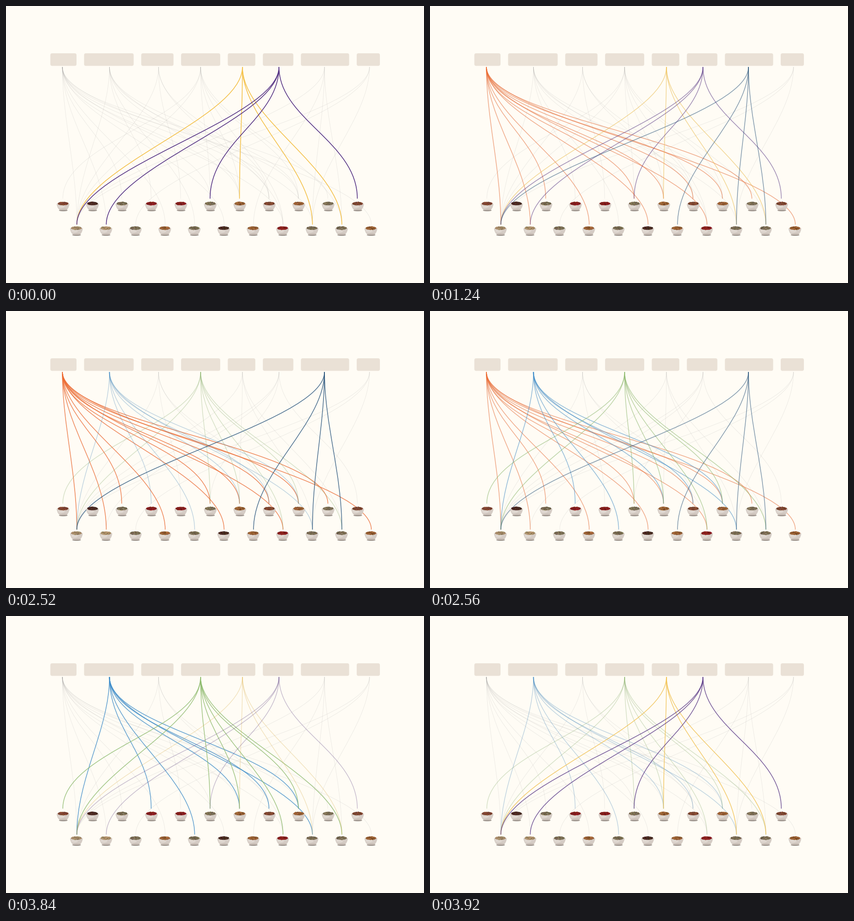
Recreate the animation shown at these times as a matplotlib script. Size 919 px wide and 609 px high, loop 3.96 s.

```python
import numpy as np
import matplotlib.pyplot as plt
from matplotlib.animation import FuncAnimation
from matplotlib.colors import to_rgb
from matplotlib.patches import Ellipse, FancyBboxPatch, PathPatch
from matplotlib.path import Path

W, H, DPI = 919, 609, 64
PX = 72 / DPI                      # one pixel in points
STEP_MS, HOLD, FADE = 40, 30, 3    # frames held and frames of cross-fade
BLOCK = HOLD + FADE
BG, TILE, FAINT = "#fffcf5", "#eae1d6", "#8c8c8c"
TILE_X, TILE_Y, TILE_H, GAP = 97.5, 104, 27.6, 16.65
TOP_Y, TOP_PULL, END_PULL = 134, 115, 125
PER_ROW = 11

# Tile width, start of its strands, colour when lit, bowls reached.
# Bowls count along the upper row, then the lower; all tiles reach SHARED.
SHARED = PER_ROW
SOURCES = [
    (57.5, 124, "#ef6c33", [2, *range(5, 10), 12, 14, 16, 18, 21]),
    (109, 227.5, "#398bcb", [3, 6, 7, 8, 15, 19]),
    (71, 335.3, None, [4, 7, 18]),
    (86, 427.8, "#8cbb6a", [0, 5, 6, 8, 18, 20]),
    (60.5, 519.8, "#f5c24a", [6, 19, 20]),
    (67, 600.2, "#553285", [5, 10, 12]),
    (106, 700.2, "#1f4e79", [17, 19, 20]),
    (51, 799.2, None, [13, 19]),
]
SCENES = [(4, 5), (0, 6), (1, 3)]  # sources lit together

SPICES = {"rust": "#7f4632", "bark": "#4a2a22", "olive": "#7b6e54",
          "red": "#861f1e", "amber": "#965f33", "tan": "#a98d68"}
MIX = """rust bark olive red red olive amber rust amber olive rust
         tan tan olive amber olive bark amber red olive olive amber""".split()

fig = plt.figure(figsize=(W / DPI, H / DPI), dpi=DPI, facecolor=BG)
ax = fig.add_axes([0, 0, 1, 1])
ax.set(xlim=(0, W), ylim=(H, 0))
ax.axis("off")


def bowl_pos(n):
    row, col = divmod(n, PER_ROW)
    return 125.5 + 29.3 * row + 64.75 * col, 436 + 54 * row


def curve(x0, bowl):
    row = bowl // PER_ROW
    x1 = bowl_pos(bowl)[0] - 0.6 + 1.5 * row
    y1 = 423.5 + 57 * row
    pts = [(x0, TOP_Y), (x0, TOP_Y + TOP_PULL), (x1, y1 - END_PULL), (x1, y1)]
    return Path(pts, [Path.MOVETO] + [Path.CURVE4] * 3)


def strand(path, color, width, **kw):
    return ax.add_patch(PathPatch(path, fc="none", ec=color, lw=width * PX,
                                  capstyle="butt", **kw))


def oval(x, y, w, h, color, z):
    return ax.add_patch(Ellipse((x, y), w, h, fc=color, ec="none", zorder=z))


def draw_bowl(n, rng):
    x, y = bowl_pos(n)
    z = 10 + n // PER_ROW
    oval(x + 0.4, y + 13.4, 19, 3.6, "#958c85", z)

    # half of a bowl outline, mirrored for the right side
    side = np.array([(-14, -1), (-13.2, 8), (-9, 12), (-6, 13)])
    pts = np.vstack([side, side[::-1] * (-1, 1), side[:1]]) + (x, y)
    codes = ([Path.MOVETO] + [Path.CURVE4] * 3 + [Path.LINETO]
             + [Path.CURVE4] * 3 + [Path.CLOSEPOLY])
    body = ax.add_patch(PathPatch(Path(pts, codes), fc="#d5ccc5", ec="none", zorder=z))
    oval(x - 4, y + 4, 15, 9, "#dfd7d0", z).set_clip_path(body)
    oval(x + 2, y + 12, 20, 5, "#c9beb6", z).set_clip_path(body)
    oval(x, y - 0.8, 28, 5, "#ddd5ce", z)

    fill = SPICES[MIX[n]]
    oval(x, y - 1.6, 23.5, 7.6, fill, z)
    count = 60
    r, ang = np.sqrt(rng.random(count)), rng.uniform(0, 2 * np.pi, count)
    dots = np.array(to_rgb(fill)) * rng.uniform(0.66, 1.3, (count, 1))
    dots += rng.normal(0, 0.035, (count, 3))
    ax.scatter(x + 11.3 * r * np.cos(ang), y - 1.7 + 3.7 * r * np.sin(ang),
               s=(1.7 * PX) ** 2, c=np.clip(dots, 0, 1), lw=0, zorder=z)


lit = {}
left = TILE_X
for src, (width, x0, hue, bowls) in enumerate(SOURCES):
    ax.add_patch(FancyBboxPatch((left, TILE_Y), width, TILE_H, fc=TILE, ec="none",
                                boxstyle="round,pad=0,rounding_size=4"))
    left += width + GAP
    paths = [curve(x0, b) for b in [SHARED, *bowls]]
    for p in paths:
        strand(p, FAINT, 0.75, alpha=0.2, zorder=2)
    if hue:
        lit[src] = [strand(p, hue, 1.6, zorder=4) for p in paths]

rng = np.random.default_rng(7)
for n in range(2 * PER_ROW):
    draw_bowl(n, rng)


def update(i):
    scene, step = divmod(i, BLOCK)
    t = max(0, step - HOLD + 1) / (FADE + 1)
    level = dict.fromkeys(lit, 0)
    for src in SCENES[scene]:
        level[src] = 1 - t
    for src in SCENES[(scene + 1) % len(SCENES)]:
        level[src] = t
    changed = []
    for src, strands in lit.items():
        for s in strands:
            s.set_alpha(level[src])
            s.set_visible(level[src] > 0)
        changed += strands
    return changed


anim = FuncAnimation(fig, update, frames=BLOCK * len(SCENES), init_func=lambda: update(0),
                     interval=STEP_MS, repeat=True, repeat_delay=0)
plt.show()
```
